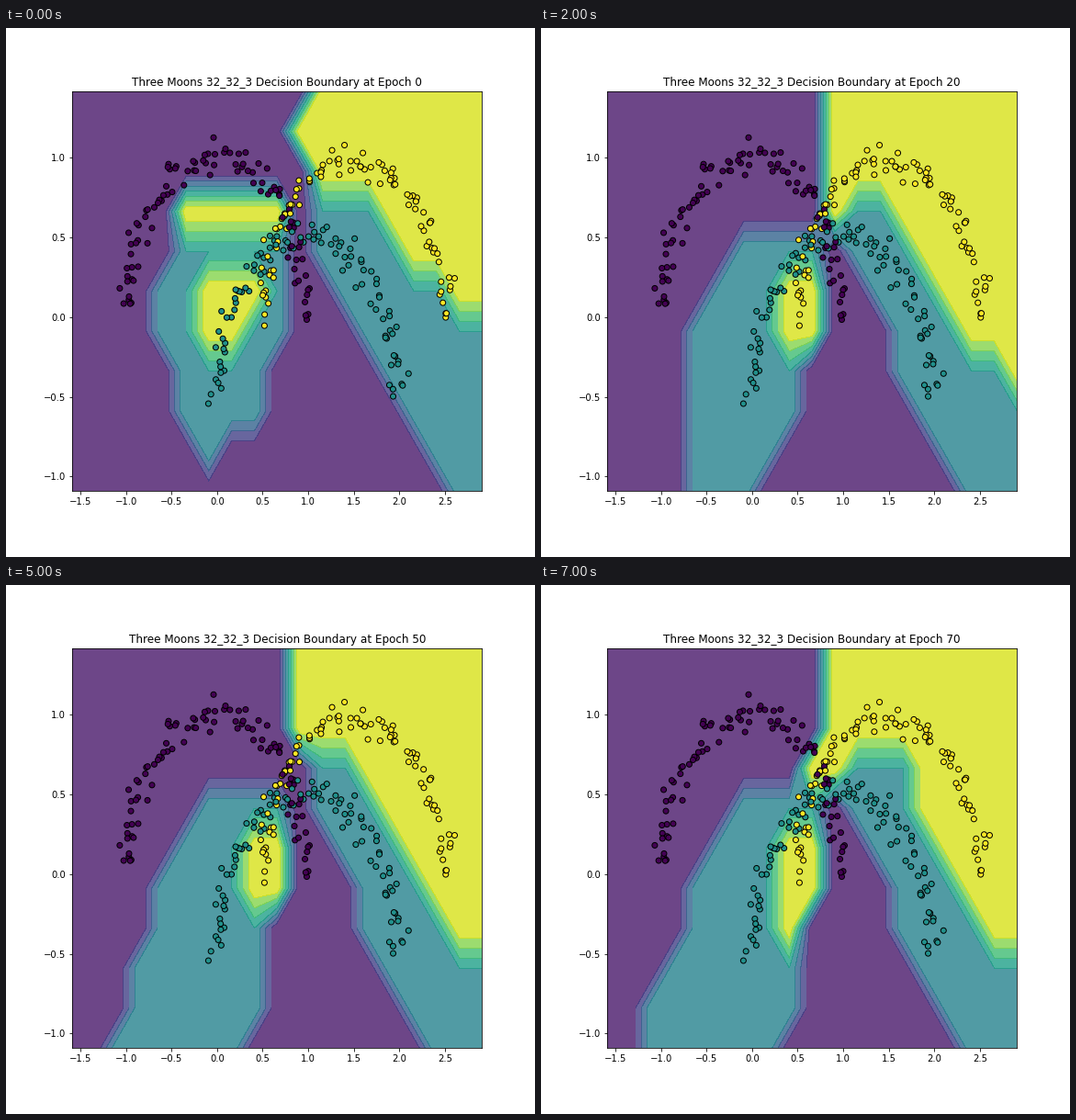
These frames come from a looping animation (576x576 px, 8 s). A matplotlib script:

```python
import numpy as np
import matplotlib.pyplot as plt
from matplotlib.animation import FuncAnimation

COLS, ROWS, STEP = 19, 11, 0.25
X_MIN, Y_MIN = -1.591, -1.0892
PER_MOON, NOISE = 100, 0.055

# The classifier is sampled on a coarse grid. Each region lies between a left
# and a right edge, given by a few (row, column) corners with row 0 at the bottom.


def column(edge, row):
    rows, cols = zip(*edge)
    return int(round(np.interp(row, rows, cols)))


def paint(grid, value, left, right):
    for row in range(left[0][0], left[-1][0] + 1):
        grid[row, column(left, row):column(right, row) + 1] = value


def classify(blob, cores, top=(10, 10, 10, 10), foot=((0, 16),),
             slope=15.3, shoulder=13, ridge=12):
    """Class of every grid node: the top right field, the valley cut into it,
    the left blob and its inner cores."""
    grid = np.zeros((ROWS, COLS))
    field = [(0, 18), (6, 11), *zip(range(7, ROWS), top)]
    paint(grid, 2, field, [(0, COLS - 1)])
    paint(grid, 1, [*foot, (6, 10.9), (7, 11)],
          [(0, 18), (2, slope + 2.9), (4, slope), (6, shoulder), (7, ridge)])
    paint(grid, 1, *blob)
    for core in cores:
        paint(grid, 2, *core)
    return grid


def legs(left, right):
    """Blob that stands on the lower edge between two columns."""
    return [(0, left), (4, 4), (6, 6)], [(0, right), (4, 9), (6, 9)]


CORE = [(4, 8), (5, 8)], [(4, 9)]
TALL_CORE = [(4, 8), (5, 8), (6, 9)], [(4, 9)]
DEEP_CORE = [(3, 8), (5, 8)], [(3, 8), (4, 9)]

grids = [
    classify(([(1, 6), (4, 4), (5, 4), (6, 5)], [(1, 6), (2, 8), (4, 9)]),
             [([(4, 6), (5, 6)], [(4, 7), (5, 8)]), ([(7, 5)], [(7, 9)])],
             top=(11, 11, 10, 11), foot=((0, 17),),
             slope=18, shoulder=14, ridge=13),
    classify(([(1, 5), (3, 4.2), (5, 4), (6, 6)], [(1, 6), (4, 9)]),
             [([(5, 8)], [(5, 8)])],
             top=(10, 10, 10, 11), foot=((0, 17), (1, 15)), ridge=11),
    classify(legs(4, 6), [CORE]),
    classify(legs(3, 6.6), [CORE], slope=15.6),
    classify(legs(2.8, 6.6), [CORE], top=(11, 10, 10, 10)),
    classify(legs(2.45, 7), [CORE], top=(11, 10, 10, 10), slope=14.8),
    classify(legs(2.45, 7), [TALL_CORE], slope=14.8),
    classify(legs(2, 7), [DEEP_CORE], top=(9, 10, 10, 10), slope=14.8, ridge=13),
]


def three_moons():
    rng = np.random.default_rng(7)
    t = np.linspace(0, np.pi, PER_MOON)
    centres = [(0, 0), (1, -0.5), (1.5, 0)]
    moons = [np.column_stack([cx + np.cos(t), cy + np.sin(t)])
             for cx, cy in centres]
    points = np.vstack(moons) + rng.normal(0, NOISE, (3 * PER_MOON, 2))
    labels = np.repeat([0, 1, 2], PER_MOON)
    order = rng.permutation(len(labels))
    return points[order].T, labels[order]


xs = X_MIN + STEP * np.arange(COLS)
ys = Y_MIN + STEP * np.arange(ROWS)
levels = np.arange(0, 2.01, 0.25)
(px, py), labels = three_moons()

plt.rcParams.update({"font.family": "DejaVu Sans", "font.size": 10})
fig = plt.figure(figsize=(8, 8), dpi=72, facecolor="white")
ax = fig.add_axes([0.125, 0.125, 0.775, 0.755])


def draw(i):
    ax.clear()
    ax.contourf(xs, ys, grids[i], levels=levels, cmap="viridis", alpha=0.8)
    ax.scatter(px, py, c=labels, s=36, cmap="viridis",
               edgecolors="black", linewidths=1)
    ax.set_xlim(xs[0], xs[-1])
    ax.set_ylim(ys[0], ys[-1])
    ax.set_title(f"Three Moons 32_32_3 Decision Boundary at Epoch {10 * i}",
                 fontsize=12)
    return []


anim = FuncAnimation(fig, draw, frames=len(grids), interval=1000,
                     init_func=lambda: draw(0), repeat=True, repeat_delay=0)
plt.show()
```
